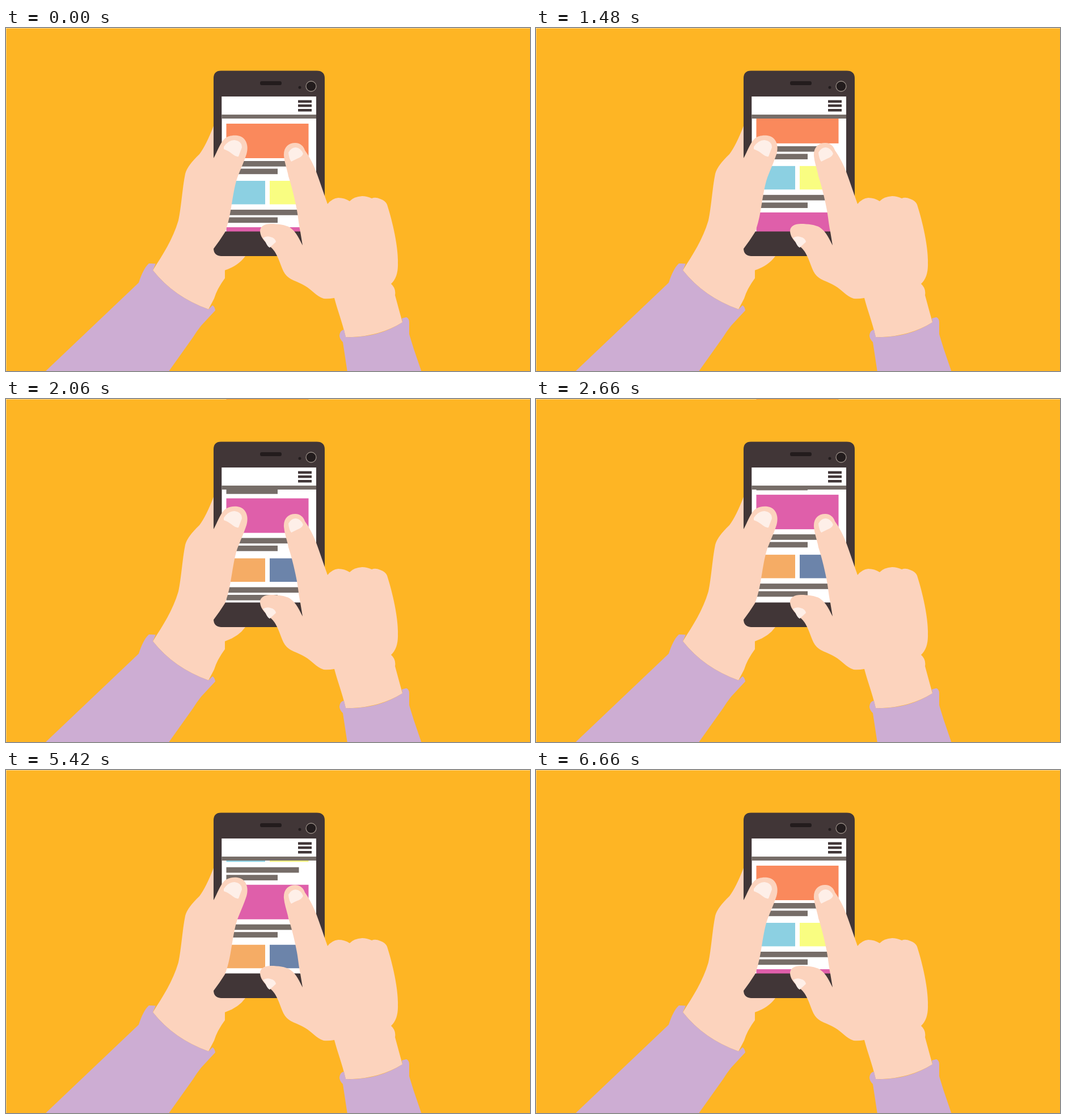
These frames come from a looping animation (924 by 606 pixels, 6.68 s). An HTML page:

```html
<!DOCTYPE html>
<html lang="en">
<head>
<meta charset="utf-8">
<title>Scrolling on a phone</title>
<style>
  html, body { margin: 0; width: 100%; height: 100%; overflow: hidden; background: #fff; }
  svg { display: block; width: 100%; height: 100%; }
  .backdrop { fill: #feb524; }
  .skin { fill: #fcd3bd; }
  .nail { fill: #feefe8; }
  .sleeve { fill: #cdadd3; }
  .body { fill: #413637; }
  .dark { fill: #231c1d; }
  .bar { fill: #766d68; }
</style>
</head>
<body>
<svg viewBox="0 0 924 606" preserveAspectRatio="none">
  <g id="page"></g>

  <!-- backdrop with a window for the page behind it -->
  <path class="backdrop" fill-rule="evenodd" d="M.4 .4H924V606H.4ZM375 115V365H552V115Z"/>

  <path class="skin" d="M366 173Q353 207 341 223Q319 244 316 258C311 282 309 318 304 340C294 374 276 401 259 428Q296 475 357 497Q364 484 367 478Q372 461 386 442V428Q410 420 422 403V395H374V173Z"/>
  <path class="sleeve" d="M68 608L234 450Q242 425 252 416L264 416.500L259 428Q296 475 357 497L364 490Q368 492 369 499L344 526Q336 536 330 546L286 608Z"/>

  <path class="body" fill-rule="evenodd" d="M379 75.500H548Q562 75.500 562 89V389Q562 403 548 403H379Q366 402 366 389V89Q366 75.500 379 75.500ZM380.500 121V359.500H547V121Z"/>
  <rect class="dark" x="448" y="94" width="38" height="7" rx="3"/>
  <circle class="dark" cx="518" cy="105" r="2.500"/>
  <circle class="dark" cx="538" cy="103" r="9" stroke="#968b84" stroke-width="1.300"/>

  <path fill="#fff" d="M380.500 121H547V153H380.500Z"/>
  <path class="bar" d="M380.500 153H547V160H380.500Z"/>
  <path class="body" d="M515 127.500h24v4.500h-24ZM515 135h24v4.500h-24ZM515 143h24v4.500h-24Z"/>

  <path class="skin" d="M364 231L366 230C373 218 376 206 385 196C394 188 412 188 419 195C427 203 427 215 423 226C419 238 413 251 408 264C402 281 399 307 396 323Q392 346 386 361Q376 377 366 390L364 390Z"/>
  <path class="nail" d="M384 210Q392 198 403 198Q416 200 416 211L410 227Q406 228 401 224Q391 216 384 214Z"/>

  <path class="skin" id="hand"/>
  <path class="nail" id="fingernail"/>
  <path class="nail" d="M453 371Q459 367 466 369Q475 371 476 378L465 388Q461 386 458 379Q456 374 453 371Z"/>
  <path class="sleeve" d="M602 608L594 555Q588 549 588 543Q589 534 596 533L599 546Q655 548 699 520L698 513L706 511Q711 513 711 520V541L719 567L733 608Z"/>
</svg>

<script>
const LOOP = 6680;
const SCROLL = 183;
const SCROLL_TIME = 2065;

const HAND = `M448 359 C448 350 456 346 467 346 C480 346 493 348 500 352
  C512 360 516 371 523 384 L519 360 C516 346 515 332 513 322
  C509 301 504 280 498 262 C496 250 491 238 490 226 C489 211 498 203 510 203
  C519 203 525 209 527 216 C535 227 541 239 547 254 C555 276 561 294 567 311
  Q575 301 586 300 Q597 300 606 306 Q613 298 628 297 Q636 297 645 301
  Q651 298 660 302 Q669 305 672 312 C683 346 692 390 691 415
  Q692 440 679 452 Q688 460 686 472 L699 520 Q660 544 610 546 L599 546
  C593 520 585 500 579 477 Q568 479 560 478 C546 473 540 463 528 456
  C515 448 503 446 495 438 C486 429 484 412 475 397 C469 385 449 377 448 359 Z`;
const NAIL = `M498 220 Q503 211 511 211 Q520 212 524 222 Q522 228 513 231
  L503 236 Q499 231 498 220 Z`;

const $ = id => document.getElementById(id);
const clamp = v => Math.min(1, Math.max(0, v));
const smooth = v => v * v * (3 - 2 * v);
const phase = (t, from, to) => clamp((t - from) / (to - from));

function expoInOut(u) {
  if (u <= 0 || u >= 1) return clamp(u);
  return u < 0.5 ? 2 ** (20 * u - 11) : 1 - 2 ** (9 - 20 * u);
}

function buildPage() {
  const rect = (x, y, w, h, fill) =>
    `<rect x="${x}" y="${y}" width="${w}" height="${h}" fill="${fill}"/>`;
  const lines = y =>
    rect(388.5, y, 128, 9.7, '#766d68') + rect(388.5, y + 13.5, 90.5, 9.7, '#766d68');
  const section = (y, banner, left, right) =>
    rect(388.5, y, 145, 61, banner) + lines(y + 66 + (y > 300 ? 4 : 0));
  const pair = (y, left, right) =>
    rect(388.5, y, 68.5, 41.5, left) + rect(465, y, 68.5, 41.5, right) + lines(y + 51);
  $('page').innerHTML =
    section(169, '#fa895c') + pair(270, '#8cd0e2', '#f9fd81') +
    section(352, '#df5faa') + pair(458, '#f5ac65', '#6c84aa');
}

// Pulls the fingertip down; the pull fades out towards the knuckles.
function bend(path, pull) {
  return path.replace(/([\d.]+) ([\d.]+)/g, (_, x, y) => {
    const weight = smooth(clamp((310 - y) / 80));
    return `${x - pull * weight / 3} ${+y + pull * weight}`;
  });
}

const press = (t, from, peak, to) =>
  smooth(phase(t, from, peak)) - smooth(phase(t, peak, to));

function draw(t) {
  const progress = expoInOut((t - 635) / SCROLL_TIME) - expoInOut((t - 4537) / SCROLL_TIME);
  $('page').setAttribute('transform', `translate(0 ${-SCROLL * progress})`);
  const pull = 12 * press(t, 100, 780, 1250) + 10 * press(t, 4520, 4900, 5460);
  $('hand').setAttribute('d', bend(HAND, pull));
  $('fingernail').setAttribute('d', bend(NAIL, pull));
}

buildPage();
const start = performance.now();
function tick() {
  draw((performance.now() - start) % LOOP);
  requestAnimationFrame(tick);
}
tick();
</script>
</body>
</html>
```
